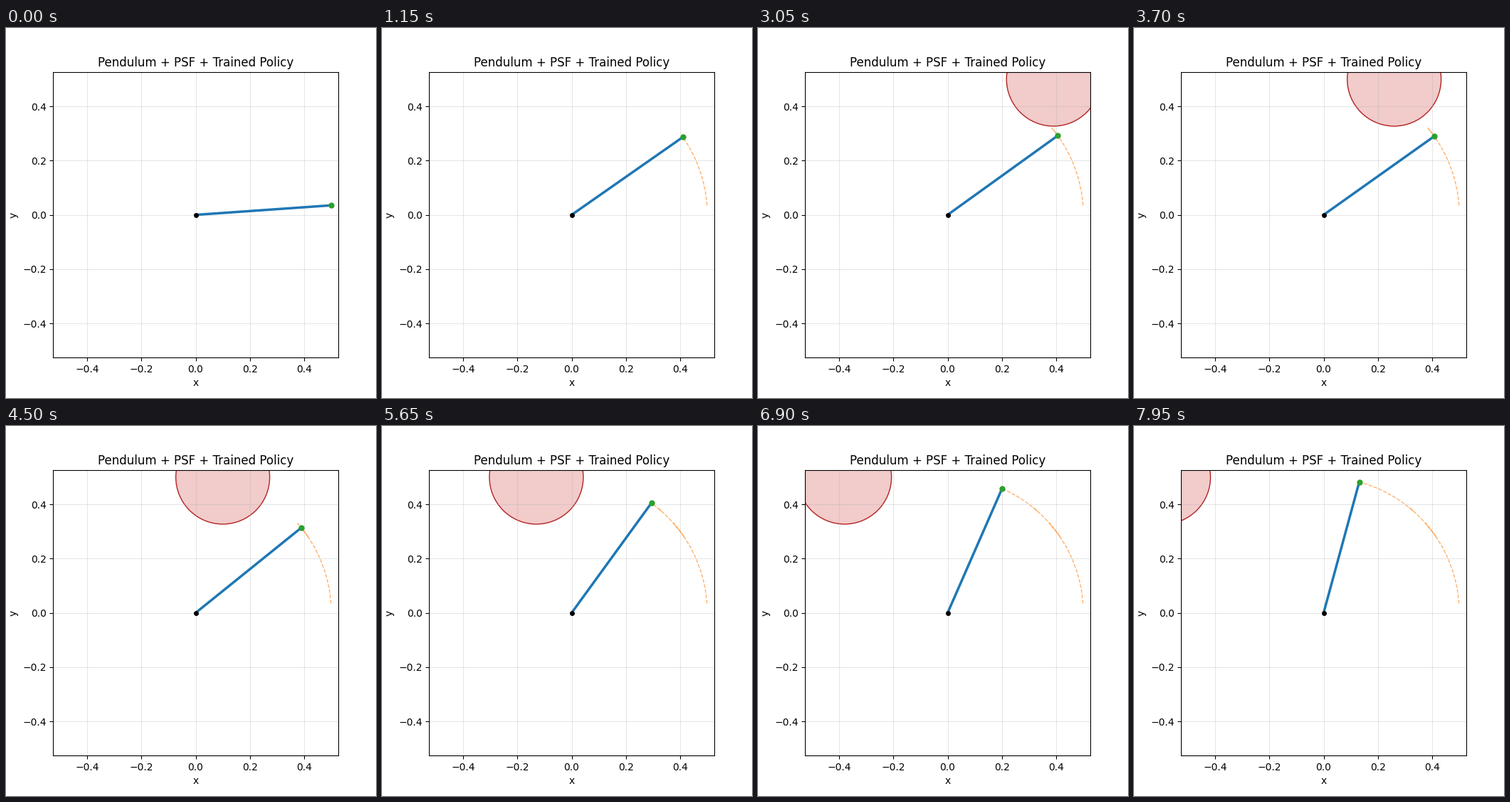
Recreate the animation shown at these times as a matplotlib script. Size 520 by 520 pixels, loop 8000 ms.

```python
import numpy as np
import matplotlib.pyplot as plt
from matplotlib.animation import FuncAnimation
from matplotlib.patches import Circle

STEP = 50
FRAMES = 160
LENGTH = 0.5
LIMIT = 0.525


def ease_out(power):
    return lambda u: 1 - (1 - u) ** power


def smooth(u):
    return u * u * (3 - 2 * u)


# Each move: end time (s), end angle (rad), easing
START_ANGLE = 0.07
MOVES = [
    (2.35, 0.693, ease_out(3)),     # swing up
    (3.50, 0.588, smooth),          # yield to the obstacle
    (4.15, 0.719, smooth),
    (4.50, 0.678, smooth),
    (4.95, 0.886, smooth),
    (5.12, 0.845, smooth),
    (7.95, 1.305, ease_out(1.15)),  # carry on towards the top
]


def swing(t):
    """Arm angle at the times t, move after move."""
    angle = np.full_like(t, START_ANGLE)
    begin, a0 = 0, START_ANGLE
    for end, a1, ease in MOVES:
        u = np.clip((t - begin) / (end - begin), 0, 1)
        angle += (a1 - a0) * ease(u)
        begin, a0 = end, a1
    return angle


times = np.arange(FRAMES) * STEP / 1000
angle = swing(times)
tip_x, tip_y = LENGTH * np.cos(angle), LENGTH * np.sin(angle)
obstacle_x = 1.0 - 0.2 * times

fig, ax = plt.subplots(figsize=(5.2, 5.2), dpi=100)
ax.set_xlim(-LIMIT, LIMIT)
ax.set_ylim(-LIMIT, LIMIT)
ax.set_aspect("equal")
ax.grid(alpha=0.3)
ax.set_xlabel("x")
ax.set_ylabel("y")
ax.set_title("Pendulum + PSF + Trained Policy")

obstacle = Circle((1.0, 0.5), 0.173, facecolor=(0.8, 0.19, 0.19, 0.25),
                  edgecolor="firebrick", lw=1)
ax.add_patch(obstacle)
trail, = ax.plot([], [], "--", color="tab:orange", lw=1, alpha=0.6)
arm, = ax.plot([], [], color="tab:blue", lw=2.5)
bob, = ax.plot([], [], "o", color="tab:green", ms=5)
ax.plot([0], [0], "o", color="black", ms=4)


def update(k):
    obstacle.center = (obstacle_x[k], 0.5)
    trail.set_data(tip_x[:k + 1], tip_y[:k + 1])
    arm.set_data([0, tip_x[k]], [0, tip_y[k]])
    bob.set_data([tip_x[k]], [tip_y[k]])
    return obstacle, trail, arm, bob


anim = FuncAnimation(fig, update, frames=FRAMES, interval=STEP,
                     repeat=True, repeat_delay=0)
plt.show()
```
